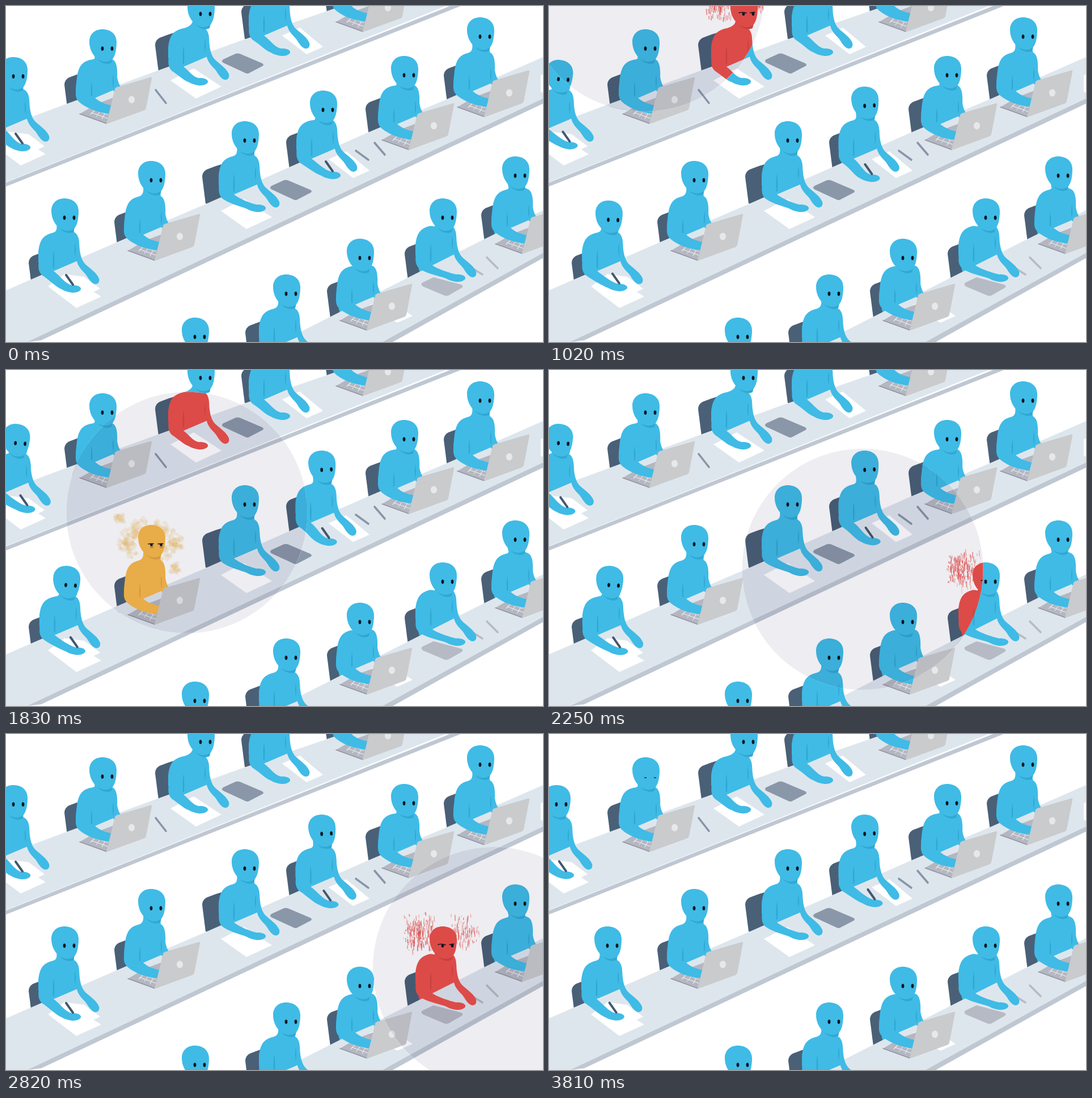
Write an HTML page with a canvas that moves like this. It is 947x592 px and loops after 3840 ms.

```html
<!DOCTYPE html>
<html lang="en">
<head>
<meta charset="utf-8">
<title>Office rows</title>
<style>
html, body { margin: 0; width: 100%; height: 100%; overflow: hidden; background: #fff; }
canvas { display: block; }
</style>
</head>
<body>
<canvas id="stage" width="947" height="592"></canvas>
<script>
const ctx = document.getElementById('stage').getContext('2d');
const LOOP = 3840, RADIUS = 212.5;
const CALM = { skin: '#3fbbe6', shade: '#30a7d3' };
const MOODS = {
  angry: { skin: '#ec514c', shade: '#d64542' },
  tired: { skin: '#f9b94c', shade: '#e5a544' }
};

// body and head are anchors; chair is its top left corner; hand shifts the left hand
const rows = [
  {
    table: 'M0,212L108,172L267,114L417,60L563,10L600,-3H783L0,311Z',
    side: 'M0,311L783,0H802L0,318Z',
    papers: [[-98, -251, 'double'], [-89, -230, 'wide'], [-82, -218, 'small']],
    pads: [[-85, -223]],
    pens: [[264, 148, 282, 171]],
    people: [
      { kind: 'write', body: [16, 87], head: [14, 90], chair: [-50, 190], hand: [-9, 9],
        lean: [400, 0, 900, 1, 2300, 1, 2750, 0], leanBy: [6, 5, .07],
        stroke: [0, 0, 1020, .85, 1500, 1, 1830, 1, 2200, .15, 2820, 0, 3840, .15], strokeBy: [6, -4] },
      { kind: 'type', body: [171, 41], head: [171, 41], chair: [103, 120], blinks: [3802], typing: LOOP },
      { kind: 'rest', body: [333, -22], head: [344, -20], chair: [263, 50], hand: [-13, 2], mood: 'angry' },
      { kind: 'rest', body: [475, -77], head: [475, -77], chair: [415, -8], hand: [-10, 5] },
      { kind: 'type', body: [623, -121], head: [623, -121], chair: [560, -54] }
    ]
  },
  {
    table: 'M0,501L196,416L352,349L638,223L778,164L947,90V163L37,592H0Z',
    side: 'M37,592L947,163V172L62,589Z',
    papers: [[0, 0, 'double'], [0, 0, 'wide'], [0, 0, 'small']],
    pads: [[0, 0]],
    pens: [[617, 255, 639, 271], [650, 241, 668, 262]],
    people: [
      { kind: 'write', body: [104, 338], head: [104, 339], chair: [40, 434], hand: [-8, 7],
        lean: [500, 0, 1400, 1, 2300, 1, 2750, 0], leanBy: [4.5, 6, .06],
        stroke: [0, 0, 1020, .8, 1530, .95, 1830, 1, 2250, .9, 2800, 0, 3840, .1], strokeBy: [6, -3] },
      { kind: 'type', body: [256, 282], head: [257, 273], chair: [191, 362], mood: 'tired' },
      { kind: 'rest', body: [422, 203], head: [422, 203], chair: [346, 282], hand: [0, 0] },
      { kind: 'write', body: [559, 140], head: [560, 149], chair: [494, 222], hand: [-5, 5],
        lean: [0, 0, 500, 1], leanBy: [-4, -7, -.05],
        stroke: [0, 0, 1000, 1, 1530, 1, 3840, 0], strokeBy: [-5, 5] },
      { kind: 'type', body: [704, 87], head: [703, 88], chair: [634, 163], typing: LOOP },
      { kind: 'type', body: [837, 29], head: [837, 20], chair: [772, 104], typing: 1630, blinks: [2520, 3050] }
    ]
  },
  {
    table: 'M478,595L573,547L708,479L843,411L947,360V435L664,592Z',
    side: 'M664,592L947,435V444L682,592Z',
    papers: [[0, 0, 'hidden']],
    pads: [],
    pens: [[824, 463, 840, 473], [848, 443, 867, 462]],
    people: [
      { kind: 'rest', body: [334, 549], head: [334, 549], chair: [270, 640], hand: [0, 0] },
      { kind: 'rest', body: [493, 472], head: [495, 473], chair: [422, 557], hand: [-8, 7] },
      { kind: 'type', body: [630, 405], head: [625, 410], chair: [566, 484], typing: LOOP },
      { kind: 'rest', body: [769, 326], head: [771, 339], chair: [703, 418], hand: [5, 0], mood: 'angry' },
      { kind: 'type', body: [904, 270], head: [899, 265], chair: [838, 350] }
    ]
  }
];

const PAPERS = {
  double: 'M74,494L104,472L168,512L124,532ZM106,473L138,477L166,498L152,505Z',
  wide: 'M379,361L420,340L469,372L424,393Z',
  small: 'M569,270L600,256L641,290L612,303Z',
  hidden: 'M640,528L668,514L717,546L690,558Z'
};
const PAD = 'M468,317L490,307Q493,306 497,307L537,324Q541,327 537,329L514,341Q511,343 507,341L468,323Q464,320 468,317Z';
const HEAD = 'M-1,0C14,0 25,9 24,25C23.5,36 22,45 18,51C13,58 1,59 -7,54C-17,48 -24,36 -24,22C-24,9 -15,0 -1,0Z';
const RIGHT_ARM = 'M10,76L25,80C26,96 28,109 36,117C46,126 56,132 60,142C62,150 56,154 50,151C42,146 40,138 34,132C26,124 22,118 20,108Z';
const RIGHT_ARM_SHORT = 'M8,72L24,74C25,90 28,101 40,112L34,122L18,108Z';

function fill(path, color) {
  ctx.fillStyle = color;
  ctx.fill(new Path2D(path));
}
function line(path, color, width) {
  ctx.strokeStyle = color;
  ctx.lineWidth = width;
  ctx.lineCap = 'round';
  ctx.stroke(new Path2D(path));
}
function oval(x, y, rx, ry, color) {
  ctx.fillStyle = color;
  ctx.beginPath();
  ctx.ellipse(x, y, rx, ry, 0, 0, 7);
  ctx.fill();
}
function at(x, y, draw) {
  ctx.save();
  ctx.translate(x, y);
  draw();
  ctx.restore();
}
function seeded(seed) {
  let s = (seed * 7919 + 12345) % 2147483647;
  return () => (s = s * 48271 % 2147483647) / 2147483647;
}

// eased value between time, value pairs
function keyed(t, keys) {
  if (!keys || t <= keys[0]) return keys ? keys[1] : 0;
  for (let i = 2; i < keys.length; i += 2) {
    if (t < keys[i]) {
      const u = (t - keys[i - 2]) / (keys[i] - keys[i - 2]);
      return keys[i - 1] + (keys[i + 1] - keys[i - 1]) * u * u * (3 - 2 * u);
    }
  }
  return keys[keys.length - 1];
}

// spotlight centre: time, x, y, joined by a smooth curve
const ROUTE = [[400, 112, -245], [1020, 168, -27], [1530, 234.5, 148], [1830, 318.5, 251],
               [2250, 552.5, 351], [2820, 859, 411.5], [3400, 1170, 450]];
function spotlight(t) {
  if (t < ROUTE[0][0] || t >= ROUTE[6][0]) return null;
  const i = ROUTE.findIndex(p => p[0] > t) - 1;
  const a = ROUTE[i], b = ROUTE[i + 1], span = b[0] - a[0], u = (t - a[0]) / span;
  const slope = (n, k) => {
    const p = ROUTE[Math.max(0, n - 1)], q = ROUTE[Math.min(6, n + 1)];
    return (q[k] - p[k]) / (q[0] - p[0]) * span;
  };
  return [1, 2].map(k => {
    const rise = u * u * (3 - 2 * u);
    return a[k] + (b[k] - a[k]) * rise + slope(i, k) * u * (1 - u) ** 2 - slope(i + 1, k) * u * u * (1 - u);
  });
}

function poseOf(p, t) {
  const lean = keyed(t, p.lean), stroke = keyed(t, p.stroke);
  const [lx, ly, turn] = p.leanBy || [0, 0, 0], [sx, sy] = p.strokeBy || [0, 0];
  const [hx, hy] = p.hand || [0, 0];
  const sway = t < p.typing ? Math.sin(t / LOOP * Math.PI * 24 + p.body[0]) : 0;
  return {
    x: p.body[0] + lx * lean * .4, y: p.body[1],
    headX: p.head[0] + lx * lean, headY: p.head[1] + ly * lean, turn: turn * lean,
    handX: hx + sx * stroke + sway, handY: hy + sy * stroke + sway * .5,
    closed: (p.blinks || []).some(b => Math.abs(t - b) < 60)
  };
}

function face(mood, closed) {
  const ink = '#0d1620';
  for (const x of [-1, 16]) {
    if (mood === 'tired') {
      oval(x + 1, 38, 3.2, 3, '#c99340');
      oval(x + .5, 35, 2.2, 2.4, ink);
      line(`M${x - 5},33.5L${x + 4},33`, ink, 1.4);
    } else {
      oval(x, closed ? 36 : 34, 2.4, closed ? .8 : mood ? 3 : 3.7, ink);
    }
  }
  if (mood === 'angry') line('M-9,32Q-3,30 4,32.5M11,32Q16,31 19,31', ink, 1.4);
}

function scribbles(t) {
  const rnd = seeded(Math.floor(t / 120) + 3);
  for (let i = 0; i < 330; i++) {
    const left = rnd() < .65;
    const x = left ? -40 + (rnd() + rnd() - 1) * 32 : 36 + (rnd() + rnd() - 1) * 32;
    const y = 10 + (rnd() + rnd() - 1) * 36 - (left ? 0 : x * .1);
    const len = 1 + rnd() * 10;
    line(`M${x},${y}l${rnd() * 2 - 1},${len}`, `rgba(236,85,82,${.35 + rnd() * .4})`, .7 + rnd() * 1.1);
  }
}

function haze() {
  const rnd = seeded(11);
  const tufts = [[-56, -12, 7], [-44, 20, 14], [-37, 44, 14], [-20, 3, 14], [-32, 10, 13],
                 [-48, 35, 10], [15, 5, 11], [32, 22, 14], [44, 32, 9], [42, 75, 9], [28, 48, 13]];
  for (const [x, y, size] of tufts) {
    for (let i = 0; i < 20; i++) {
      const px = x + (rnd() * 2 - 1) * size, py = y + (rnd() * 2 - 1) * size;
      const r = 3 + rnd() * 4, a = rnd() * 6;
      const corner = n => `${px + r * Math.cos(a + n)},${py + r * Math.sin(a + n)}`;
      fill(`M${corner(0)}L${corner(1.4)}L${corner(2.9)}L${corner(4.2)}Z`, 'rgba(240,198,120,.19)');
    }
  }
}

function upperBody(p, pose, tone, mood) {
  const dx = pose.headX - pose.x, dy = pose.headY - pose.y;
  const lift = p.kind === 'type' ? -8 : 0;
  at(pose.x, pose.y, () => {
    fill(`M${dx - 15},${dy + 44}C${dx - 14},${dy + 54} -14,${60 + lift} -23,${62 + lift}
      C-38,${66 + lift} -45,${74 + lift} -47,96L-47,112L-40,142H24L25,88C26,${76 + lift} 24,${65 + lift} 17,${61 + lift}
      C${dx + 15},${58 + lift} ${dx + 16},${dy + 56} ${dx + 17},${dy + 48}Z`, tone.skin);
  });
  at(pose.headX, pose.headY, () => {
    ctx.rotate(pose.turn);
    fill('M-9,53C-3,60 8,63 15,59L17,51Z', tone.shade);
    fill(HEAD, tone.skin);
    face(mood, pose.closed);
  });
}

function arms(p, pose, tone) {
  const a = pose.handX, b = pose.handY;
  const typing = p.kind === 'type';
  at(pose.x, pose.y, () => {
    if (typing) {
      fill(RIGHT_ARM_SHORT, tone.skin);
      fill(`M-46,90C-48,98 -48,104 -48,110C-49,124 -43,128 -34,134C-22,142 ${a - 6},${b + 146} ${a + 6},${b + 148}
        L${a + 16},${b + 147}V${b + 134}C${a + 4},${b + 132} -6,128 -14,121L21,106L24,85Z`, tone.skin);
    } else {
      fill(RIGHT_ARM, tone.skin);
      fill(`M-46,90C-47,98 -46,106 -46,112C-48,124 -46,133 -38,138C-26,146 ${a - 8},${b + 150} ${a + 2},${b + 154}
        C${a + 12},${b + 160} ${a + 28},${b + 163} ${a + 35},${b + 156}C${a + 40},${b + 150} ${a + 28},${b + 146} ${a + 20},${b + 147}
        C${a + 8},${b + 144} -8,138 -20,129L22,111L24,85Z`, tone.skin);
    }
    const low = typing ? 118 : 124;
    fill(`M-20,92Q-18,105 -19,${low}L-21,${low}Q-22,105 -20,92ZM18,79Q16,92 18,104Q20,92 18,79Z`, tone.shade);
    if (p.kind === 'write') line(`M${a + 10},${b + 129}L${a + 22},${b + 146}`, '#43586f', 4);
  });
}

function laptopBase() {
  fill('M-41,149L-10,131L22,119L6,166Z', '#b4b7c1');
  line('M-41,149L6,166', '#92949f', 1.4);
  line('M-20,147L8,157M-14,142L8,150M-22,150L-8,136M-12,154L0,138M-2,158L6,144', '#eceef2', 1.1);
}
function laptopLid() {
  fill('M21,105Q22,103 24,102L84,84.5Q87,84 86,87L76,139Q75,142 72,143L9,166Q6,167 7,163Z', '#c9cbcd');
  oval(50.5, 124, 5.6, 6.4, '#e7e8e9');
}

function chair() {
  fill('M6,66L0,19Q0,10 8,6L24,0L34,-3V66Z', '#4a6077');
}

function drawRow(row, t, moody) {
  const staff = row.people.map(p => {
    const mood = moody ? p.mood : undefined;
    return { p, mood, pose: poseOf(p, t), tone: MOODS[mood] || CALM };
  });
  for (const { p } of staff) at(...p.chair, chair);
  for (const { p, mood, pose, tone } of staff) {
    if (mood) at(pose.headX, pose.headY, () => mood === 'angry' ? scribbles(t) : haze());
    upperBody(p, pose, tone, mood);
  }
  const last = row === rows[2];
  fill(row.table, '#dee6ed');
  fill(row.side, '#bfc7d2');
  if (row === rows[0]) line('M0,310.5L782,0', '#eef3f7', 1);
  for (const [x, y, type] of row.papers) at(x, y, () => fill(PAPERS[type], '#fff'));
  for (const [x, y] of row.pads) at(x, y, () => fill(PAD, '#8a97a9'));
  if (last) fill('M735,487L754,478L803,491Q808,494 803,497L782,509Q778,512 773,510L735,494Q730,490 735,487Z', '#b6bac4');
  for (const [x, y, x2, y2] of row.pens) line(`M${x},${y}L${x2},${y2}`, last ? '#b6bac4' : '#8795a8', 3.6);
  for (const { p, pose, tone } of staff) {
    if (p.kind === 'type') at(...p.body, laptopBase);
    arms(p, pose, tone);
    if (p.kind === 'type') at(...p.body, laptopLid);
  }
}

function scene(t, moody) {
  ctx.fillStyle = '#fff';
  ctx.fillRect(0, 0, 947, 592);
  for (const row of rows) drawRow(row, t, moody);
  fill('M943,122L947,120V153L943,151Z', '#fff');
}

function render(t) {
  scene(t, false);
  const center = spotlight(t);
  if (!center) return;
  ctx.save();
  ctx.beginPath();
  ctx.arc(...center, RADIUS, 0, 7);
  ctx.clip();
  scene(t, true);
  ctx.globalCompositeOperation = 'multiply';
  ctx.fillStyle = '#eeedf1';
  ctx.fillRect(0, 0, 947, 592);
  ctx.restore();
}

const start = performance.now();
function frame() {
  render((performance.now() - start) % LOOP);
  requestAnimationFrame(frame);
}
frame();
</script>
</body>
</html>
```
